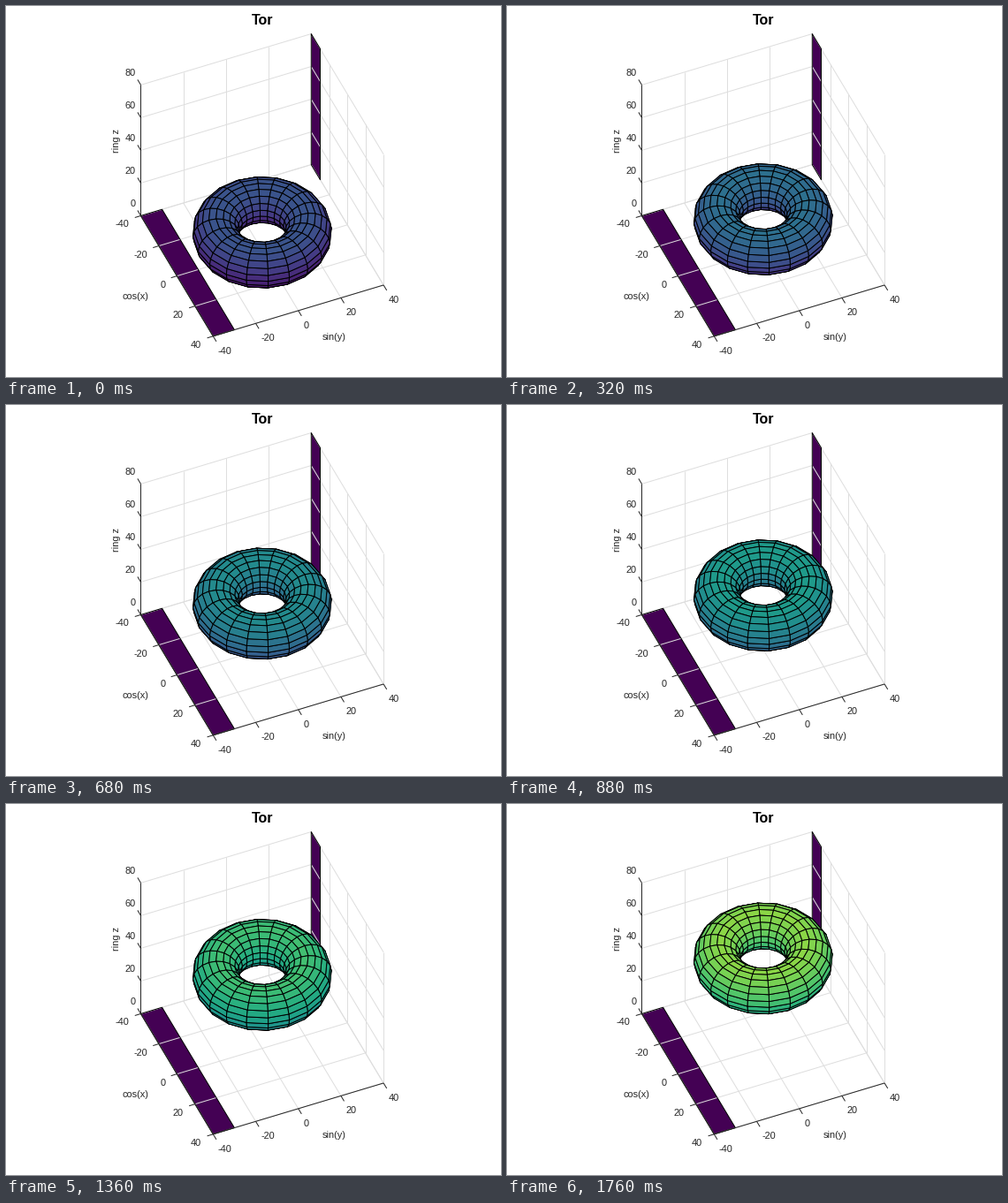
Animation of 560x420 px, one loop 1.8 s. Source, as a matplotlib script:

```python
import numpy as np
import matplotlib.pyplot as plt
from matplotlib.animation import FuncAnimation
from matplotlib.collections import LineCollection, PolyCollection

W, H, DPI = 560, 420, 100
PX = 72 / DPI                      # points per pixel
FRAMES, STEP = 45, 40
RING, TUBE, SEGS = 20, 10, 20
LIM, TOP = 40, 80
INK, GRID = "#262626", "#dedede"

plt.rcParams["font.family"] = "Liberation Sans"

# Orthographic view, 45 degrees from above
TURN = np.radians(23)
CA, SA = np.cos(TURN), np.sin(TURN)
CX, CY = 289.8, 276.7
SCALE = 2.618
TILT = SCALE * np.sqrt(0.5)


def project(x, y, z):
    right = y * CA + x * SA
    front = x * CA - y * SA
    return np.stack([CX + SCALE * right + 0 * z, CY + TILT * (front - z)], axis=-1)


def point(x, y, z):
    return project(*(np.asarray(c, float) for c in (x, y, z)))


fig = plt.figure(figsize=(W / DPI, H / DPI), dpi=DPI, facecolor="white")
ax = fig.add_axes([0, 0, 1, 1])
ax.set_xlim(0, W)
ax.set_ylim(H, 0)
ax.axis("off")
cmap = plt.get_cmap("viridis", 64)


def shade(z):
    return cmap(np.clip(np.floor(z / TOP * 64), 0, 63).astype(int))


def lines(segments, color, z):
    ax.add_collection(LineCollection(segments, colors=color, linewidths=PX, zorder=z))


def label(x, y, s, size=11, **kw):
    kw.setdefault("va", "baseline")
    ax.text(x, y, s, fontsize=size * PX, zorder=6, **kw)


# Flat strips on the floor and the back wall
floor = [point(*p) for p in ((-40, -40, 0), (-40, -30, 0), (40, -30, 0), (40, -40, 0))]
wall = [point(*p) for p in ((-40, 40, 0), (-30, 40, 0), (-30, 40, 80), (-40, 40, 80))]
for strip in (floor, wall):
    ax.add_collection(PolyCollection([strip], facecolors=[cmap(0)],
                                     edgecolors="none", zorder=1))
    lines([strip + strip[:1]], "black", 3)

# Grid on the three back planes
grid = []
for t in range(-LIM, LIM + 1, 20):
    h = t + LIM
    grid += [
        (point(t, -LIM, 0), point(t, LIM, 0)),
        (point(-LIM, t, 0), point(LIM, t, 0)),
        (point(-LIM, t, 0), point(-LIM, t, TOP)),
        (point(t, LIM, 0), point(t, LIM, TOP)),
        (point(-LIM, -LIM, h), point(-LIM, LIM, h)),
        (point(-LIM, LIM, h), point(LIM, LIM, h)),
    ]
lines(grid, GRID, 2)

# Axes, ticks and tick labels
left, near, far = point(-LIM, -LIM, 0), point(LIM, -LIM, 0), point(LIM, LIM, 0)
lines([(point(-LIM, -LIM, TOP), left, near, far)], INK, 4)


def tick(at, toward, text, dx, dy, ha):
    lines([(at, at + 7 * toward / np.hypot(*toward))], INK, 4)
    label(at[0] + dx, at[1] + dy, text, ha=ha, color=INK)


along_x, along_y = near - left, far - near
for t in range(-LIM, LIM + 1, 20):
    tick(point(t, -LIM, 0), -along_y, str(t), -13, 13, "right")
    tick(point(LIM, t, 0), along_x, str(t), 5.5, 20, "left")
    tick(point(-LIM, -LIM, t + LIM), -along_x, str(t + LIM), -6, -10.5, "right")

label(146, 331.5, "cos(x)", ha="center", color=INK)
label(371, 378, "sin(y)", ha="center", color=INK)
label(127.5, 152, "ring z", ha="center", color=INK, rotation=90, rotation_mode="anchor")
label(290, 21, "Tor", size=16, ha="center", weight="bold", color="black")

# Torus mesh, faces sorted from back to front
angle = np.linspace(0, 2 * np.pi, SEGS + 1)
u, v = np.meshgrid(angle, angle)
tx = (RING + TUBE * np.cos(v)) * np.cos(u)
ty = (RING + TUBE * np.cos(v)) * np.sin(u)
tz = TUBE * np.sin(v)


def corners(a):
    quads = np.stack([a[:-1, :-1], a[:-1, 1:], a[1:, 1:], a[1:, :-1]], axis=-1)
    return quads.reshape(-1, 4)


qx, qy, qz = corners(tx), corners(ty), corners(tz)
order = np.argsort((qx * CA - qy * SA + qz).mean(axis=1))
qx, qy, qz = qx[order], qy[order], qz[order]

torus = PolyCollection([], edgecolors="black", linewidths=PX, zorder=5)
ax.add_collection(torus)


def draw(i):
    z = qz + TUBE + 1 + i
    torus.set_verts(project(qx, qy, z))
    torus.set_facecolor(shade(z[:, 0]))
    return [torus]


anim = FuncAnimation(fig, draw, frames=FRAMES, interval=STEP, repeat=True, repeat_delay=0)
plt.show()
```
